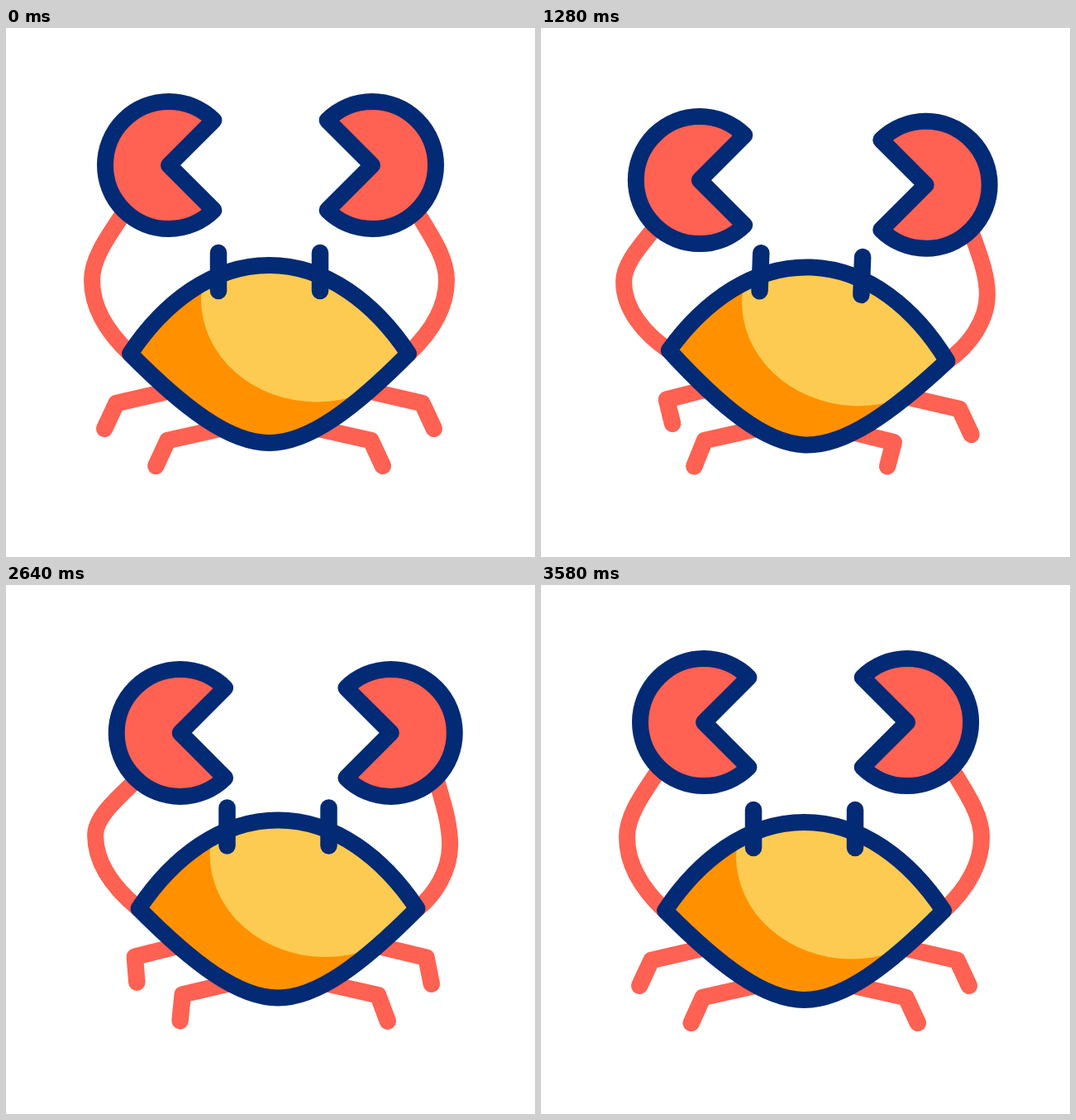
Recreate the animation shown at these times as an HTML page with a canvas. Size 640 by 640 pixels, loop 3600 ms.

```html
<!DOCTYPE html>
<html lang="en">
<head>
<meta charset="utf-8">
<title>Crab</title>
<style>
  html, body { margin: 0; width: 100%; height: 100%; overflow: hidden; background: #fff; }
  canvas { display: block; width: 640px; height: 640px; }
</style>
</head>
<body>
<canvas id="stage" width="640" height="640"></canvas>
<script>
const ctx = document.getElementById('stage').getContext('2d');
const LOOP = 3600;
const NAVY = '#032a75', RED = '#ff6152', ORANGE = '#ff9100', YELLOW = '#fdcb51';

const rad = deg => deg * Math.PI / 180;
const mix = (a, b, k) => a + (b - a) * k;

// Eases through [time, value] keys, starting and ending the loop at zero.
function curve(...keys) {
  keys = [[0, 0], ...keys, [LOOP, 0]];
  return t => {
    const i = keys.findIndex(key => t < key[0]);
    const [t0, v0] = keys[i - 1], [t1, v1] = keys[i];
    const u = (t - t0) / (t1 - t0);
    return mix(v0, v1, u * u * (3 - 2 * u));
  };
}

const shift = curve([400, -7], [860, -1.5], [1720, 11], [2280, 11], [3000, 10]);
const bob = curve([400, -11.5], [860, -1.5], [1720, 6.7], [2280, -11.5], [3000, 6.5]);
const tilt = curve([400, 5.3], [860, 4.25], [1720, 0]);
const dip = curve([400, 36], [900, 7], [1700, 37], [1900, 37], [2500, 7], [3000, 37.5]);
const sway = curve([400, -0.5], [860, 1], [1720, 17], [2280, 20.5], [3000, 16]);

// Soft snap around each peak time.
const snaps = (...peaks) => t => peaks.reduce((sum, peak) => {
  const d = Math.min(1, Math.abs(t - peak) / 240);
  return sum + (1 + Math.cos(Math.PI * d)) / 2;
}, 0);

// Half sine wave between two times.
const swing = (from, to, amount) => t =>
  t > from && t < to ? amount * Math.sin(Math.PI * (t - from) / (to - from)) : 0;

const outer = { x: 120, y: 45, reach: 65 }, inner = { x: 56, y: 90, reach: 67 };
const legs = [
  { side: -1, hip: outer, steps: [swing(0, 3500, 0.85)] },
  { side: -1, hip: inner, steps: [swing(0, 1300, 1.35), swing(1300, LOOP, 0.4)] },
  { side: 1, hip: outer, steps: [swing(1700, 2900, 0.44)] },
  { side: 1, hip: inner, steps: [swing(700, 2700, 1)] }
];
const arms = [
  { side: -1, twist: 0, shut: snaps(512, 1810, 3143) },
  { side: 1, twist: -6.6, shut: snaps(569, 2280) }
];
const blink = snaps(2280);

function pose(t) {
  const a = rad(tilt(t)), x = 318.5 + shift(t), y = 394 + bob(t);
  const onBody = (px, py) => [
    x + px * Math.cos(a) - py * Math.sin(a),
    y + px * Math.sin(a) + py * Math.cos(a)
  ];
  return { t, a, x, y, onBody, tilt: tilt(t), dip: dip(t), sway: sway(t) };
}

const clawCenter = (side, p) => [
  320 + p.sway + side * (123 + 0.35 * p.dip + 3 * p.tilt),
  166 + p.dip + 1.3 * side * p.tilt
];

function stroke(color, width = 20) {
  ctx.strokeStyle = color;
  ctx.lineWidth = width;
  ctx.stroke();
}

function polyline(color, ...points) {
  ctx.beginPath();
  points.forEach(point => ctx.lineTo(...point));
  stroke(color, 20.5);
}

function drawLeg({ side, hip, steps }, p) {
  const fold = steps.reduce((sum, step) => sum + step(p.t), 0);
  const [hx, hy] = p.onBody(side * hip.x, hip.y);
  const kx = hx + side * (hip.reach - 20 * fold), ky = hy + 15 - 3 * fold;
  const angle = rad(25 - 50 * fold), shin = 34 - 5 * fold;
  polyline(RED, [hx, hy], [kx, ky],
    [kx + side * shin * Math.sin(angle), ky + shin * Math.cos(angle)]);
}

function drawArm({ side }, p) {
  const [cx, cy] = clawCenter(side, p), [tx, ty] = p.onBody(side * 168.5, 0);
  const sx = cx + side * 56, sy = cy + 60;
  const ex = tx + side * (46 + 0.12 * p.tilt * p.dip) - 0.35 * p.sway;
  const ey = mix(cy, ty, 0.61 + 0.0015 * side * p.sway);
  const drop = ey - sy, rise = ty - ey;
  ctx.beginPath();
  ctx.moveTo(sx, sy);
  ctx.bezierCurveTo(mix(sx, ex, 0.5), sy + drop * 0.35, ex, ey - drop * 0.33, ex, ey);
  ctx.bezierCurveTo(ex, ey + rise * 0.4,
    mix(tx, ex, 0.54), ty - Math.max(0, rise - 50) * 0.6, tx, ty);
  stroke(RED);
}

function drawClaw({ side, twist, shut }, p) {
  const k = shut(p.t);
  const tipX = mix(54.4, 72, k), tipY = mix(54.4, 0, k);
  const inX = mix(20.4, 36, k), outX = mix(40, 72, k), outY = mix(68.8, 38, k);
  ctx.save();
  ctx.translate(...clawCenter(side, p));
  ctx.rotate(rad(twist * k));
  ctx.scale(-side, 1);
  ctx.beginPath();
  ctx.moveTo(0, 0);
  ctx.lineTo(tipX, tipY);
  ctx.bezierCurveTo(outX, outY, inX, 77, 0, 77);
  ctx.arc(0, 0, 77, Math.PI / 2, Math.PI * 1.5);
  ctx.bezierCurveTo(inX, -77, outX, -outY, tipX, -tipY);
  ctx.closePath();
  ctx.fillStyle = RED;
  ctx.fill();
  stroke(NAVY);
  ctx.restore();
}

function shellPath() {
  ctx.beginPath();
  ctx.moveTo(-168.5, 0);
  ctx.bezierCurveTo(-128, -61, -69, -107, 0, -107);
  ctx.bezierCurveTo(69, -107, 128, -61, 168.5, 0);
  ctx.bezierCurveTo(103, 66, 48, 108, 0, 108);
  ctx.bezierCurveTo(-48, 108, -103, 66, -168.5, 0);
  ctx.closePath();
}

function drawShell(p) {
  ctx.save();
  ctx.translate(p.x, p.y);
  ctx.rotate(p.a);
  ctx.save();
  shellPath();
  ctx.fillStyle = ORANGE;
  ctx.fill();
  ctx.clip();
  ctx.beginPath();
  ctx.ellipse(57.5, -66, 140, 124.5, 0, 0, Math.PI * 2);
  ctx.fillStyle = YELLOW;
  ctx.fill();
  ctx.restore();
  shellPath();
  stroke(NAVY);
  polyline(NAVY, [-61.5, -122], [-61.5, -76]);
  polyline(NAVY, [61.5, -122 + 25 * blink(p.t)], [61.5, -76]);
  ctx.restore();
}

function draw(t) {
  const p = pose(t);
  ctx.fillStyle = '#fff';
  ctx.fillRect(0, 0, 640, 640);
  ctx.lineCap = ctx.lineJoin = 'round';
  legs.forEach(leg => drawLeg(leg, p));
  arms.forEach(arm => drawArm(arm, p));
  drawShell(p);
  arms.forEach(arm => drawClaw(arm, p));
}

const start = performance.now();
function frame() {
  draw((performance.now() - start) % LOOP);
  requestAnimationFrame(frame);
}
frame();
</script>
</body>
</html>
```
